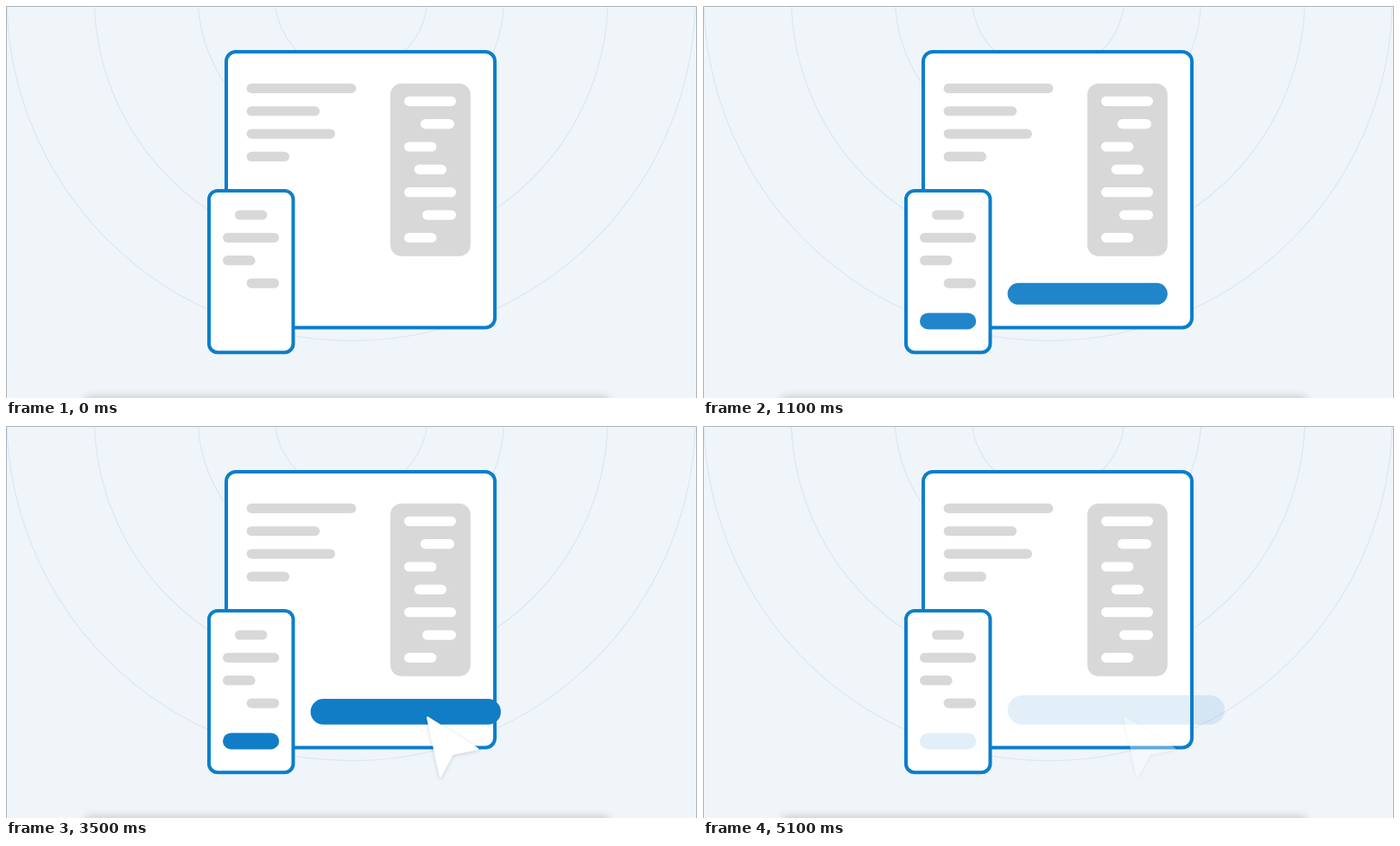
Write an HTML page that moves like this. It is 800 px wide and 454 px high and loops after 5.2 s.

```html
<!DOCTYPE html>
<html lang="en">
<head>
<meta charset="utf-8">
<title>Button growing on a page</title>
<style>
  html, body { margin: 0; width: 100%; height: 100%; overflow: hidden; background: #f0f5fa; }
  svg { display: block; width: 100vw; height: 100vh; }
</style>
</head>
<body>
<svg viewBox="0 0 800 454" xmlns="http://www.w3.org/2000/svg">
  <defs>
    <filter id="blur" x="-10%" y="-200%" width="120%" height="500%">
      <feGaussianBlur stdDeviation="5"/>
    </filter>
    <filter id="lift" x="-30%" y="-30%" width="160%" height="160%">
      <feDropShadow dx="0" dy="1" stdDeviation="2.2" flood-color="#203040" flood-opacity=".22"/>
    </filter>
  </defs>

  <rect width="800" height="454" fill="#f0f5fa"/>
  <g id="rings" fill="none" stroke="#dde6f4" stroke-width="1.2"></g>
  <rect x="92" y="452" width="606" height="20" fill="#000" opacity=".17" filter="url(#blur)"/>
  <path d="M.5 454V.5H799.5V454" fill="none" stroke="#a9b1b9"/>

  <g fill="#fff" stroke="#0a7ecb" stroke-width="4">
    <rect x="255" y="53" width="311" height="319.5" rx="11"/>
    <rect x="235" y="214" width="97.5" height="187.2" rx="10"/>
  </g>
  <rect x="445" y="89.7" width="92.8" height="200" rx="13" fill="#d8d8d8"/>
  <g id="bars"></g>

  <g id="buttons" fill="#127dc7">
    <rect x="251" y="355.4" width="65.2" height="19" rx="9.5"/>
    <rect id="wide" x="352.6" y="320.8" width="185.2" height="25" rx="12.5"/>
  </g>
  <g id="cursor">
    <path d="M1.2 1.2L59 37.4L30 43L16 69Z" fill="#fff" stroke="#fff"
          stroke-width="2.4" stroke-linejoin="round" filter="url(#lift)"/>
  </g>
</svg>
<script>
const LOOP = 5200, STEP = 100, ROW = 26.35;
const $ = id => document.getElementById(id);

function add(parent, tag, attrs) {
  const el = document.createElementNS("http://www.w3.org/2000/svg", tag);
  for (const name in attrs) el.setAttribute(name, attrs[name]);
  parent.append(el);
}

// Each span is [left, right]; rows are evenly spaced.
function addBars(top, fill, spans) {
  spans.forEach(([left, right], i) => add($("bars"), "rect", {
    x: left, y: top + i * ROW, width: right - left, height: 11.2, rx: 5.6, fill
  }));
}

for (const r of [88.5, 177.3, 297.3, 398.6]) add($("rings"), "circle", { cx: 399.5, cy: -11, r });
addBars(89.8, "#d8d8d8", [[278.6, 405.4], [278.6, 363.2], [278.6, 381], [278.6, 328]]);
addBars(104.7, "#fff", [[461, 521], [479.8, 519], [461, 498.4], [472.7, 510],
                        [461, 521], [482, 521], [461, 498.4]]);
addBars(236.4, "#d8d8d8", [[265, 302.3], [251, 316.2], [251, 288.6], [278.6, 316.2]]);

function expoInOut(x) {
  if (x <= 0) return 0;
  if (x >= 1) return 1;
  return x < .5 ? 2 ** (20 * x - 10) / 2 : 1 - 2 ** (10 - 20 * x) / 2;
}

const progress = (time, start, duration) => expoInOut((time - start) / duration);

function draw(time) {
  const shown = 1 - progress(time, 4800, 500);
  $("buttons").setAttribute("opacity", progress(time, 135, 1500) * shown);

  const scale = 1 + .357 * progress(time, 2743, 1500);
  $("wide").setAttribute("transform",
    `translate(352.6 345.8) scale(${scale}) translate(-352.6 -345.8)`);

  const entry = progress(time, 1511, 1500), left = 1 - entry;
  $("cursor").setAttribute("transform", `translate(${487 + 31 * left} ${336.5 + 99 * left})`);
  $("cursor").setAttribute("opacity", entry * Math.sqrt(shown));
}

const begin = performance.now();
function tick() {
  const time = (performance.now() - begin) % LOOP;
  draw(Math.floor(time / STEP) * STEP);
  requestAnimationFrame(tick);
}
tick();
</script>
</body>
</html>
```
